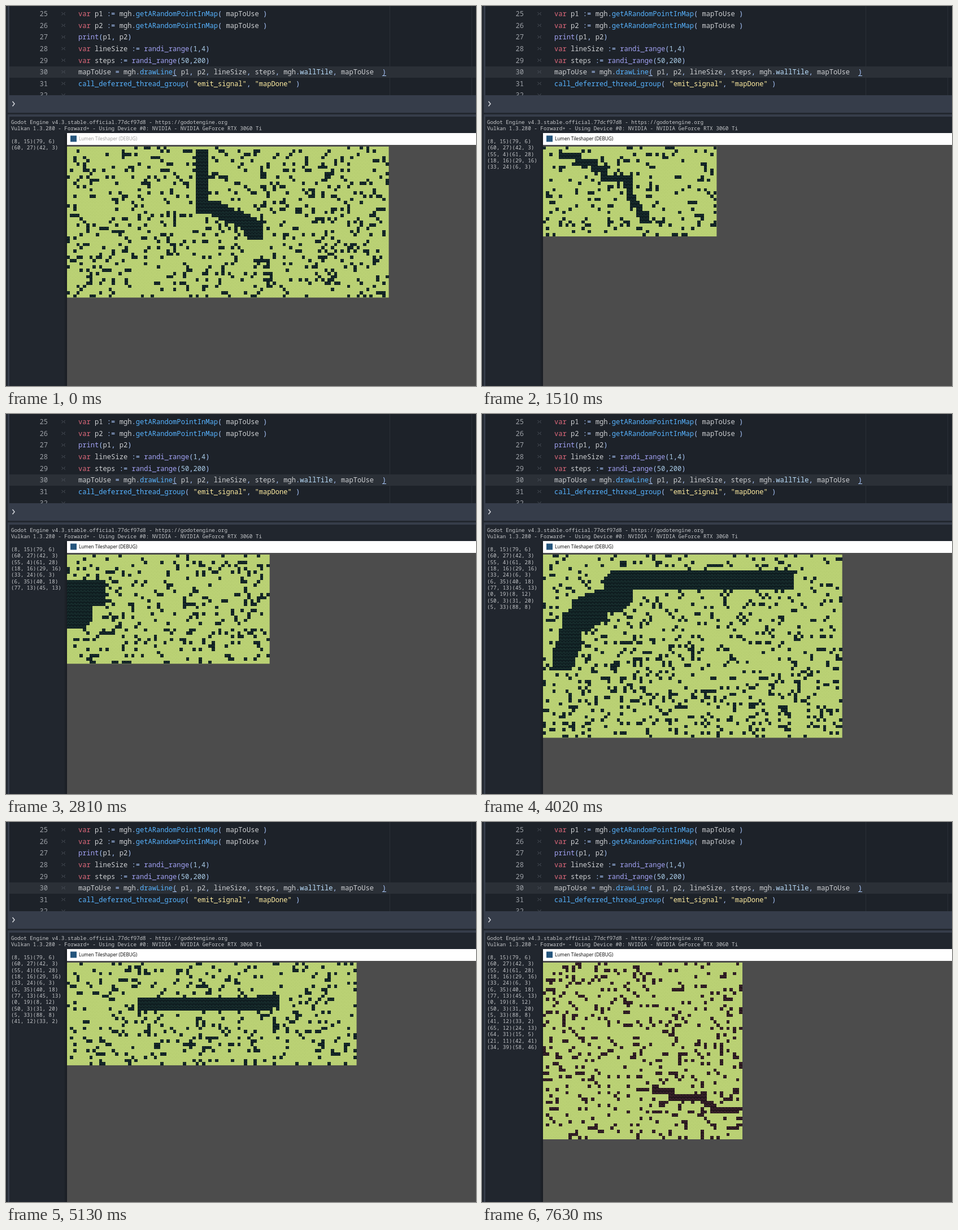
An HTML page with a canvas that plays this animation: 832x673 px, repeating every 8130 ms.

```html
<!DOCTYPE html>
<html lang="en">
<head>
<meta charset="utf-8">
<title>Map generator</title>
<style>
  html, body { margin: 0; width: 100%; height: 100%; overflow: hidden; background: #21262e; }
  svg, canvas { position: absolute; left: 0; top: 0; width: 832px; height: 673px; display: block; }
  text { white-space: pre; fill: #cdcfd2; }
  .code, .log { font-family: "Noto Sans Mono", "DejaVu Sans Mono", monospace; font-variant-ligatures: none; }
  .code { font-size: 12.11px; }
  .log { font-size: 9.25px; }
  .log text { fill: #c6c8cb; }
  .num { text-anchor: end; fill: #9da1a7; }
  .k { fill: #e0697c; }
  .f { fill: #57b3ff; }
  .g { fill: #a3a3f5; }
  .s { fill: #abc9ff; }
  .n { fill: #a9cbe6; }
  .m { fill: #bce0ff; }
  .q { fill: #ffeda1; }
  .title { font: 8.2px "Open Sans", "Noto Sans", sans-serif; animation: focus 8130ms step-end infinite; }
  @keyframes focus { 0% { fill: #999; } 3.69% { fill: #000; } }
</style>
</head>
<body>
<svg viewBox="0 0 832 673" xml:space="preserve">
  <defs>
    <clipPath id="editor"><rect x="6" width="826" height="158"/></clipPath>
    <linearGradient id="shade"><stop offset="0" stop-opacity="0"/><stop offset="1" stop-opacity=".25"/></linearGradient>
  </defs>
  <rect width="832" height="673" fill="#363d4a"/>
  <rect width="3" height="673" fill="#22272f"/>
  <rect x="6" width="826" height="158" fill="#1d2229"/>
  <rect x="6" y="107" width="826" height="20" fill="#2b3037"/>
  <path d="M679.5 0v158M824.5 0v158" stroke="#2a2f37"/>
  <rect x="3" y="189" width="829" height="3" fill="#22272f"/>
  <rect x="6" y="196" width="826" height="477" fill="#21262e"/>
  <path d="M11.5 169l3.5 4.2l-3.5 4.2" fill="none" stroke="#d5d8dd" stroke-width="1.5"/>
  <g class="code" id="code" clip-path="url(#editor)"></g>
  <path d="M295 123.5h7M666 123.5h7" stroke="#abc9ff"/>
  <g class="log" id="log"></g>
  <rect x="102" y="226" width="6" height="447" fill="url(#shade)"/>
  <rect x="108" y="225" width="724" height="448" fill="#4c4c4c"/>
  <rect x="108" y="225" width="724" height="21" fill="#fff"/>
  <rect x="114" y="229.5" width="11" height="11" fill="#25557d"/>
  <text class="title" x="129" y="238.4">Lumen Tileshaper (DEBUG)</text>
</svg>
<canvas id="map" width="832" height="673"></canvas>
<script>
const LOOP = 8130, CELL = 5.7, LEFT = 107.6, TOP = 248.5;
const $ = id => document.getElementById(id);

// Each token is "class|text"; a bare token keeps the default colour.
const random = p => ['k|var', ` ${p} `, 's|:=', ' mgh', 's|.', 'f|getARandomPointInMap', 's|(', ' mapToUse ', 's|)'];
const range = (name, a, b) => ['k|var', ` ${name} `, 's|:=', ' ', 'g|randi_range', 's|(', 'n|' + a, 's|,', 'n|' + b, 's|)'];
const lines = [
  random('p1'),
  random('p2'),
  ['g|print', 's|(', 'p1', 's|,', ' p2', 's|)'],
  range('lineSize', 1, 4),
  range('steps', 50, 200),
  ['mapToUse ', 's|=', ' mgh', 's|.', 'f|drawLine', 's|(', ' p1', 's|,', ' p2', 's|,', ' lineSize', 's|,',
    ' steps', 's|,', ' mgh', 's|.', 'm|wallTile', 's|,', ' mapToUse  ', 's|)'],
  ['f|call_deferred_thread_group', 's|(', ' ', 'q|"emit_signal"', 's|,', ' ', 'q|"mapDone"', ' ', 's|)'],
  []
];
const span = token => {
  const [cls, text] = token.includes('|') ? token.split('|') : ['', token];
  return `<tspan class="${cls}">${text}</tspan>`;
};
$('code').innerHTML = lines.map((tokens, i) => {
  const y = 18.1 + 20.6 * i;
  return `<text class="num" x="74" y="${y}">${25 + i}</text>` +
    `<path d="M98.5 ${y - 7}l2.6 2.6l-2.6 2.6M104.5 ${y - 7}l-2 2.6l2 2.6" fill="none" stroke="#4d535c"/>` +
    `<text xml:space="preserve" x="128" y="${y}">${tokens.map(span).join('')}</text>`;
}).join('');

// at: map appears, log: its points are printed, path: top-left corners of the square brush
const scenes = [
  { at: 0, log: 0, pts: '(60, 27)(42, 3)', w: 100, h: 47, size: 4,
    path: '40,1 40,17 44,17 50,20 55,22 57,23 57,25 55,24' },
  { at: 500, log: 500, pts: '(55, 4)(61, 28)', w: 81, h: 69, size: 4, path: '53,2 53,10 57,16 59,26' },
  { at: 1010, log: 1010, pts: '(18, 16)(29, 16)', w: 48, h: 27, size: 3, path: '17,15 22,14 28,15' },
  { at: 1510, log: 1510, pts: '(33, 24)(6, 3)', w: 54, h: 28, size: 2,
    path: '5,2 10,2 10,4 15,4 15,6 18,6 18,9 26,9 25,11 26,12 26,15 27,16 28,17 29,18 29,20 31,20 31,22 30,22' },
  { at: 1910, log: 2010, pts: '(6, 35)(40, 18)', w: 52, h: 60, size: 4, path: '4,33 13,31 20,25 31,21 38,16' },
  { at: 2410, log: 2410, pts: '(77, 13)(45, 13)', w: 92, h: 40, size: 3, path: '76,12 62,11 54,13 44,12' },
  { at: 2810, log: 2910, pts: '(0, 19)(8, 12)', w: 63, h: 34, size: 8, path: '4,8 0,8 0,13 -1,14 -3,15' },
  { at: 3410, log: 3510, pts: '(50, 3)(31, 20)', w: 92, h: 30, size: 4, path: '48,1 45,8 36,11 29,18' },
  { at: 3920, log: 4020, pts: '(5, 33)(88, 8)', w: 93, h: 57, size: 6,
    path: '72,5 22,5 20,6 19,7 22,8 21,10 19,12 13,12 9,14 14,14 10,17 6,18 6,23 5,24 4,28 3,30 4,29' },
  { at: 4530, log: 4630, pts: '(41, 12)(33, 2)', w: 100, h: 70, size: 4, path: '39,10 37,5 31,0' },
  { at: 5130, log: 5230, pts: '(65, 12)(24, 13)', w: 90, h: 32, size: 4, path: '22,11 60,11 59,10 62,10' },
  { at: 5730, log: 5730, pts: '(64, 31)(15, 5)', w: 70, h: 33, size: 3, path: '63,29 48,23 40,15 24,11 14,4' },
  { at: 6330, log: 6330, pts: '(21, 11)(42, 41)', w: 68, h: 53, size: 4,
    path: '20,9 21,9 25,12 27,13 28,14 31,16 31,20 35,20 35,23 39,23 40,27 40,37' },
  { at: 6930, log: 6930, pts: '(34, 39)(58, 46)', w: 62, h: 55, size: 2, red: true,
    path: '34,38 34,39 39,39 39,41 49,41 49,40 49,42 51,43 52,45 59,45' }
];

const logRow = (text, row) =>
  `<text xml:space="preserve" x="9" y="${(208.8 + 11.36 * row).toFixed(2)}">${text}</text>`;
$('log').innerHTML =
  logRow('Godot Engine v4.3.stable.official.77dcf97d8 - https://godotengine.org', 0) +
  logRow('Vulkan 1.3.280 - Forward+ - Using Device #0: NVIDIA - NVIDIA GeForce RTX 3060 Ti', 1) +
  logRow('(8, 15)(79, 6)', 3) +
  scenes.map((s, i) => logRow(s.pts, 4 + i)).join('');
const rows = [...$('log').children].slice(3);

function seeded(seed) {
  return () => {
    seed = seed + 0x6D2B79F5 | 0;
    let t = Math.imul(seed ^ seed >>> 15, 1 | seed);
    t = t + Math.imul(t ^ t >>> 7, 61 | t) ^ t;
    return ((t ^ t >>> 14) >>> 0) / 4294967296;
  };
}

function buildWalls({ w, h, size, path }, seed) {
  const rnd = seeded(seed);
  const walls = Array.from({ length: h }, () => Array.from({ length: w }, () => rnd() < 0.155));
  const stamp = (x, y) => {
    for (let r = y; r < y + size; r++)
      for (let c = x; c < x + size; c++)
        if (r >= 0 && r < h && c >= 0 && c < w) walls[r][c] = true;
  };
  const points = path.split(' ').map(p => p.split(',').map(Number));
  points.slice(1).forEach(([x1, y1], i) => {
    const [x0, y0] = points[i];
    const n = Math.max(Math.abs(x1 - x0), Math.abs(y1 - y0));
    for (let k = 0; k <= n; k++)
      stamp(Math.round(x0 + (x1 - x0) * k / n), Math.round(y0 + (y1 - y0) * k / n));
  });
  return walls;
}

const ctx = $('map').getContext('2d');
const box = (color, x, y, w, h) => { ctx.fillStyle = color; ctx.fillRect(x, y, w, h); };

function drawMap(scene, index) {
  const [mortar, brick] = scene.red ? ['#23161c', '#4b2b35'] : ['#0f1d20', '#1d3836'];
  const px = c => Math.round(LEFT + c * CELL), py = r => Math.round(TOP + r * CELL);
  ctx.clearRect(0, 0, 832, 673);
  const x0 = px(0), y0 = py(0);
  box('#bad174', x0, y0, LEFT + scene.w * CELL - x0, TOP + scene.h * CELL - y0);
  buildWalls(scene, 71 + index * 13).forEach((row, r) => row.forEach((wall, c) => {
    const x = px(c), y = py(r), w = px(c + 1) - x, h = py(r + 1) - y;
    if (wall) {
      box(mortar, x, y, w, h);
      box(brick, x + 1, y + 1, w - 2, 1);
      box(brick, x, y + 3, 2, 1);
      box(brick, x + 3, y + 3, w - 3, 1);
    } else {
      box('#b2c96d', x + 1, y + 1, 1, 1);
      box('#b2c96d', x + 4, y + 3, 1, 1);
    }
  }));
}

let shown = -1;
function frame() {
  const t = performance.now() % LOOP;
  const index = scenes.filter(s => s.at <= t).length - 1;
  if (index !== shown) drawMap(scenes[shown = index], index);
  rows.forEach((row, i) => row.setAttribute('visibility', scenes[i].log <= t ? 'visible' : 'hidden'));
  requestAnimationFrame(frame);
}
frame();
</script>
</body>
</html>
```
